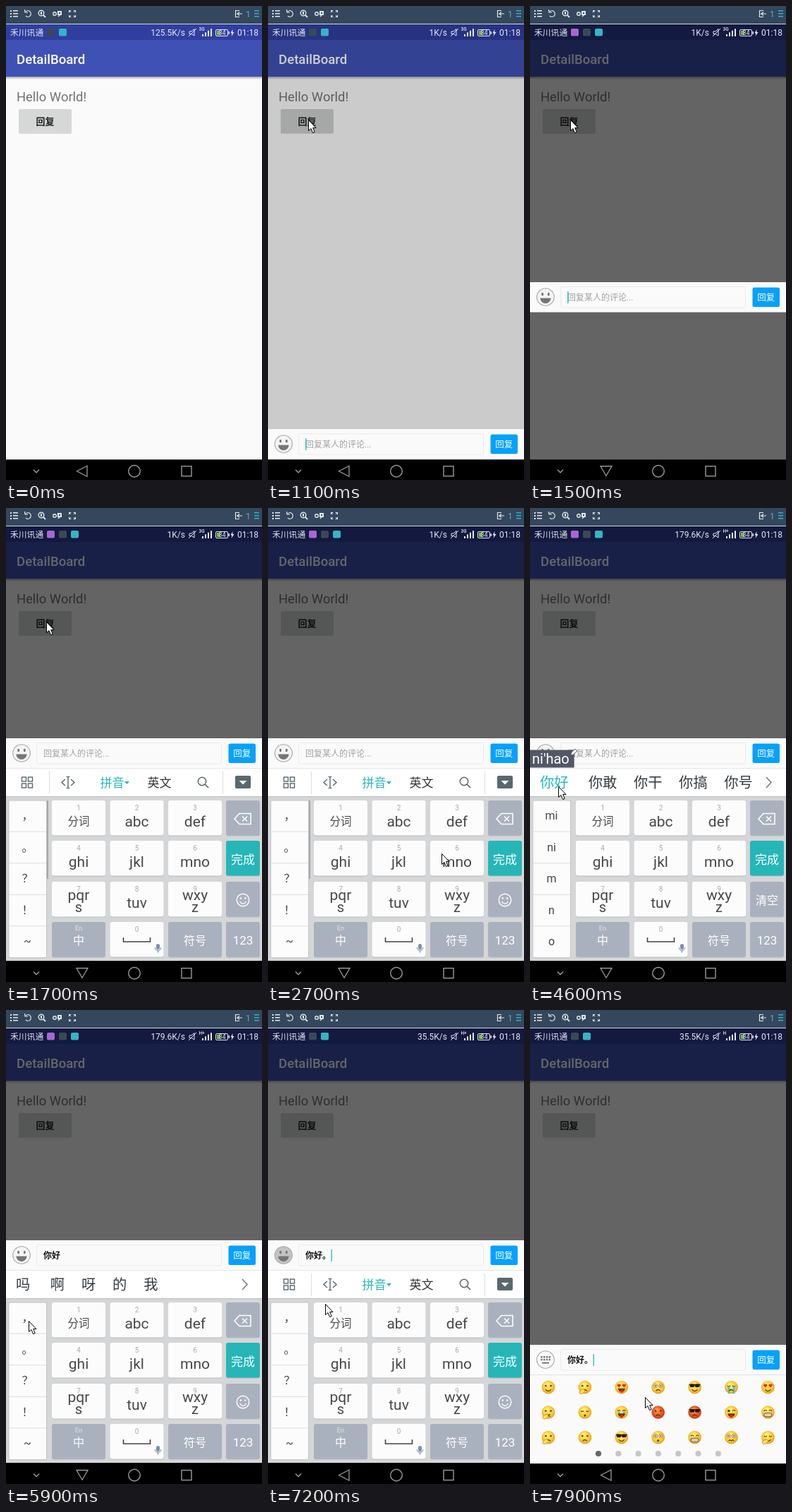
Write an HTML page with a canvas that moves like this. It is 363 px wide and 671 px high and loops after 8000 ms.

```html
<!DOCTYPE html>
<html lang="zh-CN">
<head>
<meta charset="utf-8">
<style>
html, body { margin: 0; width: 100%; height: 100%; overflow: hidden; background: #fafafa; }
canvas { display: block; }
</style>
</head>
<body>
<canvas id="stage" width="363" height="671"></canvas>
<script>
const c = document.getElementById('stage').getContext('2d');
const LOOP = 8000, STEP = 100, TEAL = '#26b6b8';
const FONT = 'Roboto, "Noto Sans CJK SC", "Noto Sans CJK", sans-serif';

// ---- drawing helpers
function rect(x, y, w, h, color) { c.fillStyle = color; c.fillRect(x, y, w, h); }
function round(x, y, w, h, r, fill, stroke) {
  c.beginPath(); c.roundRect(x, y, w, h, r);
  if (fill) { c.fillStyle = fill; c.fill(); }
  if (stroke) { c.strokeStyle = stroke; c.lineWidth = 1; c.stroke(); }
}
function disc(x, y, r, fill, stroke, width = 1) {
  c.beginPath(); c.arc(x, y, r, 0, 7);
  if (fill) { c.fillStyle = fill; c.fill(); }
  if (stroke) { c.strokeStyle = stroke; c.lineWidth = width; c.stroke(); }
}
function arc(x, y, r, from, to, color, width = 1) {
  c.beginPath(); c.arc(x, y, r, from * Math.PI, to * Math.PI);
  c.strokeStyle = color; c.lineWidth = width; c.stroke();
}
function path(points, { fill, stroke, width = 1, close = false }) {
  c.beginPath();
  for (let i = 0; i < points.length; i += 2) c.lineTo(points[i], points[i + 1]);
  if (close) c.closePath();
  if (fill) { c.fillStyle = fill; c.fill(); }
  if (stroke) { c.strokeStyle = stroke; c.lineWidth = width; c.stroke(); }
}
const line = (points, stroke, width) => path(points, { stroke, width });
function text(s, x, y, size, color, align = 'left', weight = 400) {
  c.font = `${weight} ${size}px ${FONT}`;
  c.textAlign = align; c.fillStyle = color; c.fillText(s, x, y);
}
const at = (x, y, draw) => { c.save(); c.translate(x, y); draw(); c.restore(); };

// ---- timeline helpers
const pick = (steps, t) => steps.reduce((v, [time, value]) => t >= time ? value : v, null);
function tween(keys, t) {
  if (t <= keys[0][0]) return keys[0].slice(1);
  for (let i = 1; i < keys.length; i++) {
    const [t0, ...a] = keys[i - 1], [t1, ...b] = keys[i];
    if (t < t1) return a.map((v, k) => v + (b[k] - v) * (t - t0) / (t1 - t0));
  }
  return keys[keys.length - 1].slice(1);
}

const SPEED = [[0, '125.5K/s'], [900, '1K/s'], [3000, '5K/s'], [3700, '179.6K/s'], [6000, '35.5K/s']];
const NETWORK = [[0, '3G'], [3700, 'H+'], [7500, 'H']];
const DIM = [[1000, 0], [1100, .19], [1300, .52], [1400, .6]];
const BAR_Y = [[1100, 599], [1300, 599], [1400, 470], [1500, 391], [1600, 340], [1700, 326],
  [7200, 326], [7300, 599], [7400, 599], [7500, 474]];
const POINTER = [[100, 262, 188], [600, 57, 161], [2000, 57, 161], [2600, 246, 489], [3200, 246, 489],
  [3400, 100, 497], [3600, 100, 497], [3800, 182, 440], [4000, 260, 510], [4200, 267, 517],
  [4600, 40, 394], [5700, 40, 394], [6200, 20, 508], [6500, 24, 486], [6600, 24, 486],
  [6900, 18, 345], [7000, 18, 345], [7200, 81, 416], [7400, 81, 416], [7900, 163, 548]];
const PRESSED = [[2900, '6'], [3000, ''], [3400, '4'], [3500, ''], [3600, '4'], [3700, ''],
  [3800, '2'], [3900, ''], [4000, '6'], [4100, '']];
const PINYIN = [[0, ''], [3000, 'o'], [3400, 'ni'], [3600, "ni'h"], [3800, "ni'ha"], [4100, "ni'hao"], [4800, '']];
const WORDS = [[0, ''], [3000, '哦 吗 你 那 呢'], [3400, '你 米 密 泥 迷'], [3600, '你和 你还 你会 密海 你很'],
  [3800, '你哈 你还 你干 你刚 你港'], [4100, '你好 你敢 你干 你搞 你号'], [4800, '吗 啊 呀 的 我'], [6600, '']];
const SIDE = [[0, '， 。 ？ ！ ~'], [3000, 'o m n 6 ~'], [3400, 'mi ni m n o'], [4800, '， 。 ？ ！ ~']];
const REPLY = [[0, ''], [4800, '你好'], [6600, '你好。']];

// ---- chrome around the app
function desktopBar() {
  rect(0, 0, 363, 25, '#34475c');
  rect(0, 25, 363, 1, '#d3d9df');
  const w = '#e3e8ec';
  for (let i = 0; i < 3; i++) {
    rect(6, 6 + i * 4, 2, 2, w); rect(10, 6 + i * 4, 7, 1.5, w);
    rect(352, 6 + i * 4, 7, 1.5, '#27b3cf');
  }
  arc(31, 11, 4.3, -.8, .75, w, 1.2);
  line([26.5, 5, 27, 9, 31, 9], w, 1.2);
  disc(50, 10, 3.8, null, w, 1.4); line([53, 13, 56, 16], w, 1.8); rect(49, 8, 2, 4, w);
  disc(69, 11, 2.3, null, w, 1.4); rect(73, 7, 6, 6, w); rect(75, 9, 2, 2, '#34475c'); line([74, 15, 77, 12], w, 1.2);
  for (const [sx, sy] of [[-1, -1], [1, -1], [-1, 1], [1, 1]])
    line([94 + sx * 2, 11 + sy * 2, 94 + sx * 4.5, 11 + sy * 4.5, 94 + sx * 1.8, 11 + sy * 4.5,
      94 + sx * 4.5, 11 + sy * 4.5, 94 + sx * 4.5, 11 + sy * 1.8], w, 1);
  line([331, 6.5, 325.5, 6.5, 325.5, 15.5, 331, 15.5], w, 1.2);
  line([335, 11, 328, 11, 331, 8.5], w, 1.2); line([328, 11, 331, 13.5], w, 1.2);
  text('1', 340, 15.5, 12, '#5fa9c6');
}

function statusBar(t) {
  const w = '#e6e8f4';
  text('禾川讯通', 6, 42, 11.8, w);
  const icons = ['#3a4a52', '#35b5c4'];
  if (t >= 1300 && t < 7100) icons.unshift('#a866d4');
  icons.forEach((color, i) => round(58 + i * 17, 32, 11, 10.5, 2, color));
  text(pick(SPEED, t), 254, 42, 12, w, 'right');
  path([260, 36, 263, 36, 267, 32.5, 267, 42, 263, 39.5, 260, 39.5], { stroke: w, close: true });
  line([259, 43, 270, 32], w, 1);
  text(pick(NETWORK, t), 273.5, 35, 6.5, w, 'left', 500);
  for (let i = 0; i < 4; i++) rect(278 + i * 4, 40 - i * 2.6, 2, 3 + i * 2.6, w);
  round(297.5, 33.5, 17, 9, 1.5, null, w);
  rect(299, 35, 5, 6, '#79c142'); rect(315.5, 36, 1.5, 4, w);
  text('34', 306.5, 41.3, 9, w, 'center');
  path([321.5, 33, 318.5, 38.5, 320.5, 38.5, 319.5, 43, 323.5, 37, 321.3, 37], { fill: w });
  text('01:18', 358, 42, 12, w, 'right');
}

function appPage(t) {
  rect(0, 26, 363, 616, '#fafafa');
  rect(0, 26, 363, 22, '#303f9f');
  const shade = c.createLinearGradient(0, 100, 0, 104);
  shade.addColorStop(0, 'rgba(0,0,0,.33)'); shade.addColorStop(1, 'rgba(0,0,0,0)');
  rect(0, 100, 363, 4, shade);
  rect(0, 48, 363, 52, '#3f51b5');
  text('DetailBoard', 15, 82, 18.6, '#fff', 'left', 500);
  text('Hello World!', 15, 135, 18.4, '#737373');
  round(18, 146.5, 75, 34.5, 2, 'rgba(0,0,0,.12)');
  round(18, 146, 75, 34, 2, t >= 800 && t < 1500 ? '#cccdcd' : '#d6d7d7');
  text('回复', 55.5, 168, 13, '#222', 'center', 700);
}

function navBar(t) {
  rect(0, 642, 363, 29, '#000');
  const g = '#9a9a9a';
  line([39, 656.5, 43, 660.5, 47, 656.5], g, 1.5);
  const down = t >= 1500 && t < 7100;
  path(down ? [100, 651.5, 116, 651.5, 108, 665] : [100.5, 658.5, 115, 651, 115, 666],
    { stroke: g, width: 1.3, close: true });
  disc(182, 658.5, 8.3, null, g, 1.4);
  c.strokeRect(249, 651.5, 14, 14);
}

// ---- reply bar
function smileButton(pressed) {
  disc(0, 0, 12.3, pressed ? '#c4c4c4' : '#f4f4f4', '#a6a6a6', 1.1);
  for (const x of [-4.3, 4.3]) { c.beginPath(); c.ellipse(x, -4, 1.5, 2.2, 0, 0, 7); c.fillStyle = '#757575'; c.fill(); }
  c.beginPath(); c.arc(0, 1.5, 7.6, 0, Math.PI); c.closePath(); c.fillStyle = '#757575'; c.fill();
}
function keyboardButton() {
  disc(0, 0, 12.3, '#fafafa', '#a6a6a6', 1.1);
  for (let i = 0; i < 8; i++) rect(-6.8 + i % 4 * 3.8, -5 + (i >> 2) * 3.8, 2.4, 2.4, '#777');
  rect(-5, 3.6, 10, 2, '#777');
}
function replyBar(t) {
  rect(0, 0, 363, 42.5, '#fafafa');
  rect(0, 0, 363, 1, '#fff');
  at(22, 21, () => t >= 7300 ? keyboardButton() : smileButton(t >= 6900));
  round(43.5, 6.5, 262, 29.5, 3, '#fafafa', '#ebebeb');
  const reply = pick(REPLY, t);
  text(reply || '回复某人的评论...', 53, 26, 12, reply ? '#111' : '#a2a2a2', 'left', reply ? 700 : 400);
  if (t > 7000 || t % 1000 < 550) rect(53 + reply.length * 12 + (reply ? .5 : 0), 13, 1.5, 17, '#3cc3cc');
  round(315.5, 7.5, 38.5, 27.5, 2.5, '#06a1fb');
  text('回复', 334.8, 25.6, 12.5, '#fff', 'center');
}

// ---- soft keyboard
function toolbar() {
  const g = '#59666d';
  for (let i = 0; i < 4; i++) { c.strokeStyle = g; c.lineWidth = 1.4; c.strokeRect(22.5 + i % 2 * 9, 381 + (i >> 1) * 9, 6, 6); }
  rect(61, 373, 1, 32, '#ddd'); rect(307, 373, 1, 32, '#ddd');
  line([84, 384, 79, 388.5, 84, 393], g, 1.4); line([92, 384, 97, 388.5, 92, 393], g, 1.4);
  line([88, 381, 88, 396], g, 1.4); line([85.5, 380.5, 90.5, 380.5], g, 1.2); line([85.5, 396.5, 90.5, 396.5], g, 1.2);
  text('拼音', 133.5, 394.5, 17, TEAL);
  path([168, 387, 175, 387, 171.5, 391], { fill: TEAL });
  text('英文', 200.5, 394.5, 17, '#333');
  disc(278, 387, 5.7, null, g, 1.5); line([282, 391, 287, 396], g, 1.7);
  round(325, 379, 22, 18, 2, '#59686f');
  path([330.5, 386, 341.5, 386, 336, 391.5], { fill: '#fff' });
}

function candidates(words, pinyin) {
  words.split(' ').forEach((word, i) => {
    const x = 14 + i * (word.length * 20 + 24.2) + (i ? 4.5 : 0);
    text(word, x, 395.5, 20.3, i === 0 && pinyin ? TEAL : '#333a40');
  });
  line([335, 381, 342, 388.5, 335, 396], '#777', 1.5);
  if (!pinyin) return;
  c.font = `20px ${FONT}`;
  const w = c.measureText(pinyin).width + 10;
  rect(0, 342.5, w, 25, '#535866');
  text(pinyin, 3, 362, 20, '#fff');
  path([w - 5, 350, w - 4, 346, w + 1, 341, w + 4, 344, w - 1, 349], { fill: '#fff', stroke: '#555', close: true });
}

const COLS = [65, 147.5, 230, 312], ROWS = [414, 471, 529, 586];
function key(col, row, color) {
  const w = col === 3 ? 48 : 76;
  round(COLS[col], ROWS[row] + 1, w, 49.5, 3, '#b9bbbf');
  round(COLS[col], ROWS[row], w, 49.5, 3, color);
  return [COLS[col] + w / 2, ROWS[row]];
}
function keyboard(t) {
  const words = pick(WORDS, t), pinyin = pick(PINYIN, t), pressed = pick(PRESSED, t);
  rect(0, 368, 363, 41, '#fff');
  rect(0, 368, 363, 1, '#e4e4e4');
  rect(0, 408, 363, 233, '#d5d6d7');
  rect(0, 408, 363, 1, '#bdbdbd');
  rect(0, 641, 363, 1, '#000');
  words ? candidates(words, pinyin) : toolbar();

  round(4, 414, 53.5, 222.5, 2, '#fcfcfc', '#c2c4c6');
  if (t < 3000) rect(58, 414, 2, 111, '#a5a7aa');
  pick(SIDE, t).split(' ').forEach((s, i) => {
    if (i) rect(4, 413 + i * 44.6, 53, 1, '#dcdcdc');
    text(s, 30.5, 441 + i * 44.6, 16, '#444', 'center');
  });

  ['分词', 'abc', 'def', 'ghi', 'jkl', 'mno', 'pqr s', 'tuv', 'wxy z'].forEach((label, i) => {
    const digit = String(i + 1), [x, y] = key(i % 3, Math.floor(i / 3), pressed === digit ? '#d0d2d6' : '#fcfcfc');
    const [a, b] = label.split(' ');
    text(digit, x, y + 13.5, 10, '#aaa', 'center');
    text(a, x, y + (b ? 26 : i ? 36.5 : 35), i ? 21 : 15.5, '#484848', 'center');
    if (b) text(b, x, y + 43, 20, '#484848', 'center');
  });

  const GRAY = '#aab1be';
  let [x, y] = key(0, 3, GRAY);
  text('En', x, y + 12, 9.5, '#e0e3e8', 'center');
  text('中', x, y + 32, 16, '#fff', 'center');
  [x, y] = key(1, 3, '#fcfcfc');
  text('0', x, y + 13.5, 10, '#aaa', 'center');
  line([x - 19, y + 22, x - 19, y + 28, x + 19, y + 28, x + 19, y + 22], '#444', 1.6);
  round(x + 27.5, y + 31, 5, 8, 2.5, '#7990ad');
  arc(x + 30, y + 36, 4.3, 0, 1, '#7990ad', 1.1);
  line([x + 30, y + 40, x + 30, y + 43.5], '#7990ad', 1.2);
  [x, y] = key(2, 3, GRAY);
  text('符号', x, y + 31.5, 16, '#fff', 'center');
  [x, y] = key(3, 3, GRAY);
  text('123', x, y + 32, 17, '#fff', 'center');

  [x, y] = key(3, 0, GRAY);
  path([x - 12, y + 26, x - 5, y + 18.5, x + 11, y + 18.5, x + 11, y + 33.5, x - 5, y + 33.5],
    { stroke: '#fff', width: 1.5, close: true });
  line([x - 1, y + 22.5, x + 6, y + 29.5], '#fff', 1.5); line([x + 6, y + 22.5, x - 1, y + 29.5], '#fff', 1.5);
  [x, y] = key(3, 1, TEAL);
  text('完成', x, y + 32.5, 17, '#fff', 'center');
  [x, y] = key(3, 2, GRAY);
  if (pinyin) text('清空', x, y + 31.5, 16, '#fff', 'center');
  else {
    disc(x, y + 26, 8.7, null, '#fff', 1.4);
    disc(x - 3.2, y + 23.5, 1.2, '#fff'); disc(x + 3.2, y + 23.5, 1.2, '#fff');
    arc(x, y + 26.5, 4.6, .1, .9, '#fff', 1.3);
  }
}

// ---- emoji panel: each code is eyes, mouth, extra
const FACES = ['.u', '.nh', 'vDr', 'on', 'gu', '-nt', 'vu', '.xh', '-o', '^Dt', '.nr', 'gnr', 'wp', '^T',
  '.nh', '.n', 'gu', 'oo', '^T', 'o~', '-uh'];
function face([eyes, mouth, extra]) {
  const dark = '#5b3210', red = '#e3261f';
  const skin = c.createRadialGradient(-2, -4, 1, 0, 0, 10);
  const tones = extra === 'r' && mouth === 'n' ? ['#ff9a4d', '#e4501c', '#b92d10'] : ['#fff27a', '#fbc72e', '#dc8f16'];
  tones.forEach((tone, i) => skin.addColorStop([0, .7, 1][i], tone));
  disc(0, 0, 9.3, skin);
  for (const s of [-1, 1]) {
    const x = s * 3.6, y = -2;
    if (eyes === '.') disc(x, y, 1.3, dark);
    if (eyes === 'o') { disc(x, y, 2.5, '#fff', dark, .6); disc(x, y, 1, dark); }
    if (eyes === 'v') { disc(x - 1.1, y - 1, 1.5, red); disc(x + 1.1, y - 1, 1.5, red); path([x - 2.5, y - .6, x + 2.5, y - .6, x, y + 2.6], { fill: red }); }
    if (eyes === 'g') round(x - 3.3, y - 2.5, 6.6, 4.5, 1.8, '#1d1a18');
    if (eyes === '-') arc(x, y - 1, 2, .1, .9, dark, 1.1);
    if (eyes === '^' || eyes === 'w' && s > 0) arc(x, y + 1, 2, 1.1, 1.9, dark, 1.1);
    if (eyes === 'w' && s < 0) disc(x, y, 1.8, dark);
    if (extra === 't') rect(x - 1.3, y + 1, 2.6, mouth === 'n' ? 10 : 4, '#49bfe0');
  }
  if (eyes === 'g') rect(-8, -4.3, 16, 1.3, '#1d1a18');
  if (mouth === 'u') arc(0, 1, 4.4, .15, .85, dark, 1.2);
  if (mouth === 'n') arc(0, 7, 3.4, 1.15, 1.85, dark, 1.2);
  if (mouth === 'o') disc(0, 4.5, 1.6, dark);
  if (mouth === 'D' || mouth === 'p') {
    c.beginPath(); c.arc(0, 1.8, 5, 0, Math.PI); c.closePath(); c.fillStyle = dark; c.fill();
    disc(0, 5.5, 2.3, red);
  }
  if (mouth === 'T') { round(-5.5, 1.2, 11, 5, 2, '#fff', dark); line([-5, 3.7, 5, 3.7], dark, .6); }
  if (mouth === '~') line([-4, 5, -2, 3.5, 0, 5, 2, 3.5, 4, 5], dark, 1.1);
  if (mouth === 'x') { line([-2.5, 2.5, 2.5, 6], dark, 1.2); line([2.5, 2.5, -2.5, 6], dark, 1.2); }
  if (extra === 'h') { c.beginPath(); c.ellipse(-4, 6.2, 4.3, 2.6, -.5, 0, 7); c.fillStyle = '#ffe05c'; c.fill(); c.strokeStyle = '#bd7b12'; c.lineWidth = .7; c.stroke(); }
}
function emojiPanel() {
  rect(0, 516, 363, 126, '#fafafa');
  rect(0, 516, 363, 1, '#e2e2e2');
  FACES.forEach((code, i) => at(26 + i % 7 * 51.9, 534 + Math.floor(i / 7) * 35.5, () => face(code)));
  for (let i = 0; i < 7; i++) disc(97 + i * 28.3, 628, 4.1, i ? '#c6c6c6' : '#666');
}

function pointer(t) {
  const [x, y] = tween(POINTER, t);
  at(Math.round(x) + .5, Math.round(y) + .5, () => path(
    [0, 0, 0, 15, 3.5, 12, 6, 18, 8.7, 17, 6.2, 11, 10.5, 11], { fill: '#fff', stroke: '#000', close: true }));
}

function draw(t) {
  appPage(t);
  const [dim] = tween(DIM, t);
  rect(0, 26, 363, 616, `rgba(0,0,0,${dim})`);
  desktopBar();
  statusBar(t);
  if (t >= 1100) at(0, Math.round(tween(BAR_Y, t)[0]), () => replyBar(t));
  if (t >= 1600 && t < 7300) keyboard(t);
  if (t >= 7500) emojiPanel();
  navBar(t);
  if (t >= 100) pointer(t);
}

const start = performance.now();
function tick() {
  const t = (performance.now() - start) % LOOP;
  draw(Math.floor(t / STEP) * STEP);
  requestAnimationFrame(tick);
}
tick();
</script>
</body>
</html>
```
